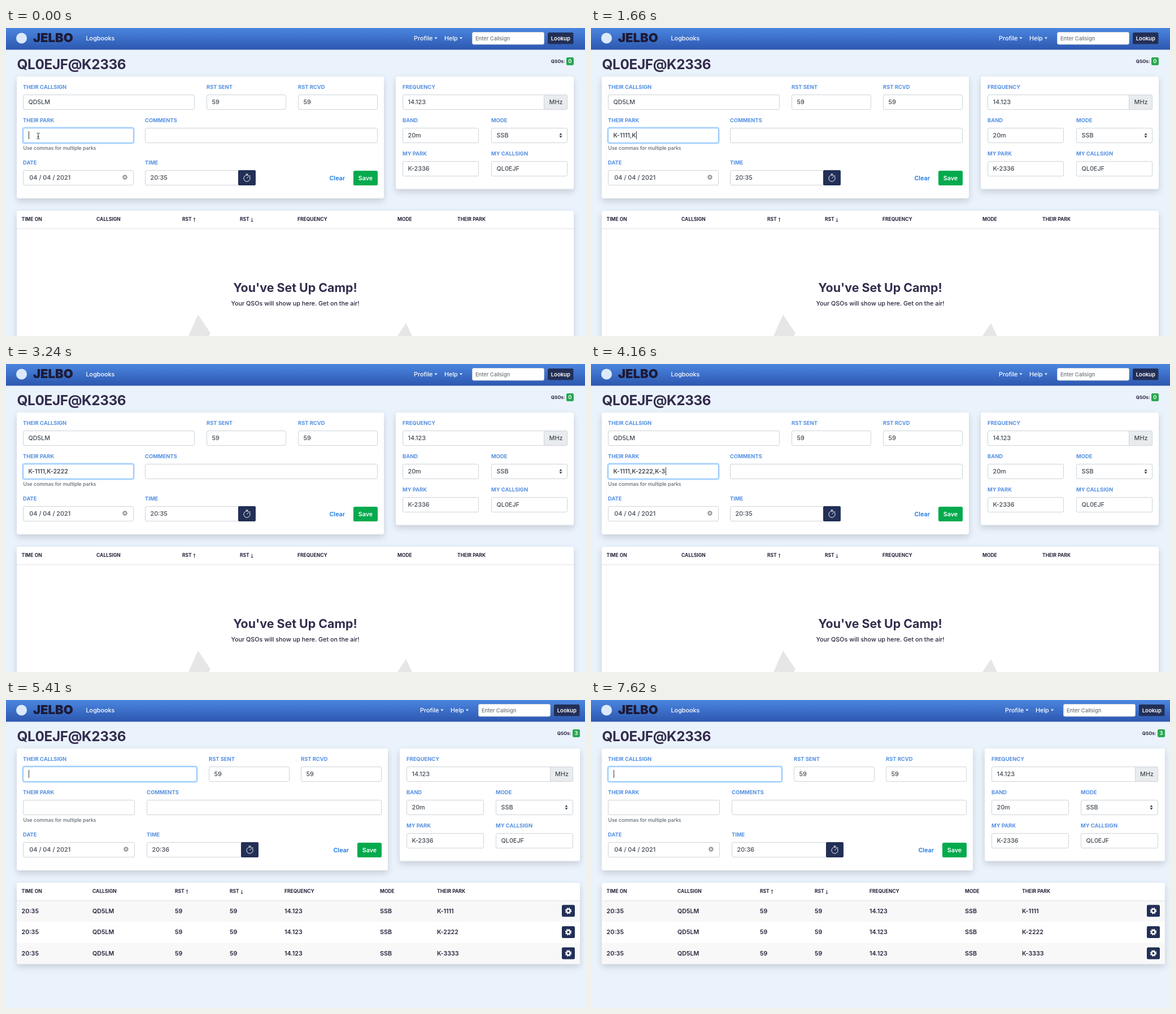
Animation, 1025 px wide and 546 px high, one loop 7720 ms. Source, as an HTML page:

```html
<!DOCTYPE html>
<html lang="en">
<head>
<meta charset="utf-8">
<title>Radio log</title>
<style>
  html, body { margin: 0; width: 100%; height: 100%; overflow: hidden; background: #eaf2fc; }
  svg { display: block; width: 1025px; height: 546px; font-family: Inter, Roboto, sans-serif; }
  .brand { font-size: 22px; font-weight: 900; fill: #1d1a36; }
  .nav { font-size: 10.8px; font-weight: 500; fill: #fff; }
  .title { font-size: 24.4px; font-weight: 700; fill: #332c4c; letter-spacing: -.4px; }
  .label { font-size: 9.4px; font-weight: 700; fill: #5590e2; }
  .value { font-size: 10.8px; font-weight: 500; fill: #434a52; }
  .typed { font-size: 10.6px; font-weight: 600; fill: #434a52; }
  .date { font-size: 10.9px; font-weight: 500; fill: #434a52; }
  .hint { font-size: 8.7px; font-weight: 500; fill: #5f6870; }
  .search { font-size: 9.3px; font-weight: 500; fill: #6c757d; }
  .small { font-size: 9.5px; font-weight: 600; fill: #fff; }
  .count { font-size: 8px; font-weight: 700; fill: #2b2740; }
  .link { font-size: 10.7px; font-weight: 600; fill: #1877e8; }
  .save { font-size: 10.7px; font-weight: 600; fill: #fff; }
  .head { font-size: 8.5px; font-weight: 700; fill: #25233a; }
  .row { font-size: 10.7px; font-weight: 600; fill: #25233a; }
  .camp { font-size: 21.4px; font-weight: 700; fill: #332c4c; }
  .sub { font-size: 10.8px; font-weight: 500; fill: #25233a; }
  .mid { text-anchor: middle; }
  .card { fill: #fff; filter: drop-shadow(0 5px 6px rgba(0, 0, 0, .15)); }
</style>
</head>
<body>
<svg id="stage" viewBox="0 0 1025 546"></svg>
<script>
const LOOP = 7720;
const CLEARED = 5370, SAVED = 5410, POINTER_GONE = 290;
const NAVY = '#222f56', GREEN = '#04aa4d';
const CALL = 'QD5LM', OWN = 'QL0EJF';

// time, text in the park field, caret shown
const TYPING = [
  [0, '', 1], [80, '', 0], [290, 'K', 0], [370, 'K', 1], [660, 'K', 0],
  [790, 'K-', 1], [870, 'K-1', 1], [950, 'K-11', 1], [1000, 'K-111', 1],
  [1080, 'K-1111', 1], [1250, 'K-1111', 0], [1450, 'K-1111,', 0],
  [1540, 'K-1111,', 1], [1660, 'K-1111,K', 1], [1790, 'K-1111,K', 0],
  [2080, 'K-1111,K-', 0], [2370, 'K-1111,K-', 1], [2450, 'K-1111,K-2', 1],
  [2540, 'K-1111,K-22', 1], [2620, 'K-1111,K-222', 1],
  [2700, 'K-1111,K-2222', 1], [2870, 'K-1111,K-2222K', 1],
  [3000, 'K-1111,K-2222K', 0], [3080, 'K-1111,K-2222', 1],
  [3240, 'K-1111,K-2222', 0], [3490, 'K-1111,K-2222,', 0],
  [3540, 'K-1111,K-2222,', 1], [3790, 'K-1111,K-2222,K', 0],
  [3830, 'K-1111,K-2222,K', 1], [3990, 'K-1111,K-2222,K-', 0],
  [4080, 'K-1111,K-2222,K-', 1], [4160, 'K-1111,K-2222,K-3', 1],
  [4240, 'K-1111,K-2222,K-33', 1], [4330, 'K-1111,K-2222,K-333', 1],
  [4410, 'K-1111,K-2222,K-3333', 1], [4660, 'K-1111,K-2222,K-3333', 0],
  [4950, 'K-1111,K-2222,K-3333', 1], [5250, 'K-1111,K-2222,K-3333', 0],
  [CLEARED, '', 0]
];
const BLINKS = [CLEARED, 5620, 5910, 6200, 6500, 6790, 7080, 7330, 7620];

// the page with and without the space taken by a scrollbar
const NARROW = {
  edge: 1005, form: 669, side: 690, call: 334, sent: 355, sentEnd: 496, rcvd: 517,
  park: 226, mid: 246, inner: 658, clock: 411, radio: 702, unit: 953, radioEnd: 994,
  band: 837, mode: 859, cols: [27.5, 160, 312, 414, 516, 693, 799], count: 0
};
const WIDE = {
  edge: 1016, form: 676, side: 697, call: 338, sent: 359, sentEnd: 502, rcvd: 522,
  park: 228, mid: 249, inner: 665, clock: 416, radio: 709, unit: 964, radioEnd: 1004,
  band: 846, mode: 867, cols: [27.5, 153, 299, 396, 493, 662, 763], count: 3
};

const text = (x, y, cls, str, id = '') =>
  `<text x="${x}" y="${y}" class="${cls}" ${id && `id="${id}"`}>${str}</text>`;
const box = (x1, y1, x2, y2, fill, r = 2.5) =>
  `<rect x="${x1}" y="${y1}" width="${x2 - x1}" height="${y2 - y1}" rx="${r}" fill="${fill}"/>`;
const card = (x1, y1, x2, y2) =>
  `<rect class="card" x="${x1}" y="${y1}" width="${x2 - x1}" height="${y2 - y1}" rx="3.5"/>`;
const line = (d, color, width = 1) =>
  `<path d="${d}" fill="none" stroke="${color}" stroke-width="${width}"/>`;
const shape = (d, color) => `<path d="${d}" fill="${color}"/>`;
const outline = (x1, y, x2, color = '#ced4da', height = 26) =>
  `<rect x="${x1 + .5}" y="${y + .5}" width="${x2 - x1 - 1}" height="${height}" rx="2.5" fill="#fff" stroke="${color}"/>`;

function field(x1, y, x2, label, value = '', cls = 'value') {
  return text(x1, y - 10, 'label', label) + outline(x1, y, x2) +
    text(x1 + 9.5, y + 17, cls, value);
}

function ring(x1, y, x2, id) {
  return `<g id="${id}">` +
    `<rect x="${x1 - .5}" y="${y - .5}" width="${x2 - x1 + 1}" height="28" rx="3.5" fill="none" stroke="#bfdeff" stroke-width="2.6"/>` +
    outline(x1, y, x2, '#80bdff') + '</g>';
}

function gear(x, y) {
  return box(x - 11.5, y - 10.5, x + 11.5, y + 10.5, NAVY) +
    `<g fill="none" stroke="#fff"><circle cx="${x}" cy="${y}" r="3.2" stroke-width="2.4"/>` +
    `<circle cx="${x}" cy="${y}" r="4.9" stroke-width="1.8" stroke-dasharray="2.1 1.75"/></g>`;
}

function stopwatch(x, y) {
  return box(x, y, x + 31, y + 27, NAVY, 2) +
    `<circle cx="${x + 15.5}" cy="${y + 14.5}" r="5.6" fill="none" stroke="#fff"/>` +
    line(`M${x + 13.5} ${y + 7}h4M${x + 15.5} ${y + 7}v2M${x + 20} ${y + 9}l1.5 1.5M${x + 15.5} ${y + 14.5}l2.5 -3`, '#fff');
}

function navBar(L) {
  const e = L.edge;
  const drop = x => shape(`M${x} 16.5h5l-2.5 3z`, '#fff');
  return text(e - 283, 21.5, 'nav', 'Profile') + drop(e - 246.5) +
    text(e - 229, 21.5, 'nav', 'Help') + drop(e - 202) +
    outline(e - 180, 7, e - 52, '#ced4da', 21.5) + text(e - 174, 21.5, 'search', 'Enter Callsign') +
    box(e - 46, 8, e - .5, 28.5, NAVY) + text(e - 23.2, 21.7, 'small mid', 'Lookup') +
    text(e - 40.3, 62, 'count', 'QSOs:') + box(e - 13, 52, e, 66, '#28a750') +
    text(e - 6.5, 62.2, 'small mid', L.count);
}

function logForm(L, time) {
  const x = L.park - 15.5;
  return card(19, 86, L.form, 302) +
    field(30, 118, L.call, 'THEIR CALLSIGN') +
    field(L.sent, 118, L.sentEnd, 'RST SENT', '59') +
    field(L.rcvd, 118, L.inner, 'RST RCVD', '59') +
    field(30, 177, L.park, 'THEIR PARK') +
    text(30.5, 215.5, 'hint', 'Use commas for multiple parks') +
    field(L.mid, 177, L.inner, 'COMMENTS') +
    field(30, 252, L.park, 'DATE') + text(41.3, 269, 'date', '04 / 04 / 2021') +
    `<circle cx="${x}" cy="264.5" r="4.2" fill="#98989b"/>` +
    line(`M${x - 1.7} 262.8l3.4 3.4m0 -3.4l-3.4 3.4`, '#fff', 1.1) +
    field(L.mid, 252, L.clock + 2, 'TIME', time) + stopwatch(L.clock, 252) +
    text(L.inner - 85.5, 270, 'link', 'Clear') +
    box(L.inner - 43, 253, L.inner, 279, GREEN) +
    text(L.inner - 21.5, 270, 'save mid', 'Save');
}

function radioForm(L) {
  const x = L.radioEnd - 12;
  return card(L.side, 86, L.edge, 285.5) +
    field(L.radio, 118, L.radioEnd, 'FREQUENCY', '14.123') +
    `<rect x="${L.unit - .5}" y="118.5" width="${L.radioEnd - L.unit}" height="26" rx="2" fill="#e9ecef" stroke="#ced4da"/>` +
    text((L.unit + L.radioEnd) / 2, 135, 'value mid', 'MHz') +
    field(L.radio, 177, L.band, 'BAND', '20m') +
    field(L.mode, 177, L.radioEnd, 'MODE', 'SSB') +
    shape(`M${x - 2.5} 189.5h5l-2.5 -3.2zM${x - 2.5} 191.2h5l-2.5 3.2z`, '#343a40') +
    field(L.radio, 236, L.band, 'MY PARK', 'K-2336') +
    field(L.mode, 236, L.radioEnd, 'MY CALLSIGN', OWN);
}

function tableHead(L) {
  const names = ['TIME ON', 'CALLSIGN', 'RST', 'RST', 'FREQUENCY', 'MODE', 'THEIR PARK'];
  const up = L.cols[2] + 21.5, down = L.cols[3] + 21.5;
  return names.map((name, i) => text(L.cols[i], 342.3, 'head', name)).join('') +
    line(`M${up} 343.5v-7m-1.6 1.8l1.6 -1.8l1.6 1.8M${down} 336.8v7m-1.6 -1.8l1.6 1.8l1.6 -1.8`, '#25233a', .9) +
    box(19, 355, L.edge, 356.5, '#e9eaec', 0);
}

function emptyTable(L) {
  return card(19, 324, L.edge, 600) + tableHead(L) +
    text(512, 468, 'camp mid', "You've Set Up Camp!") +
    text(512, 492, 'sub mid', 'Your QSOs will show up here. Get on the air!') +
    shape('M340 508L362 541L359 546H323zM708 523L719 546H693z', '#e6e6e7');
}

function filledTable(L) {
  const rows = ['K-1111', 'K-2222', 'K-3333'].map((park, i) => {
    const y = 355.5 + i * 37.6;
    const cells = ['20:35', CALL, '59', '59', '14.123', 'SSB', park];
    return box(19, y, L.edge, y + 37.5, i % 2 ? '#fff' : '#f8f8f9', i === 2 ? 3 : 0) +
      cells.map((cell, c) => text(L.cols[c], y + 22.2, 'row', cell)).join('') +
      gear(L.edge - 20.5, y + 18.3);
  });
  return card(19, 324, L.edge, 468) + rows.join('') + tableHead(L);
}

const stage = document.getElementById('stage');
stage.innerHTML =
  '<defs><linearGradient id="sky" x2="0" y2="1"><stop stop-color="#4b86df"/>' +
  '<stop offset="1" stop-color="#2c57b0"/></linearGradient></defs>' +
  box(0, 0, 1025, 546, '#eaf2fc', 0) + box(0, 0, 1025, 38.5, 'url(#sky)', 0) +
  '<circle cx="27.5" cy="18" r="9.5" fill="#dce9fa"/>' +
  text(48, 25.2, 'brand', 'JELBO') + text(141.5, 21.5, 'nav', 'Logbooks') +
  text(19.5, 73, 'title', OWN + '@K2336') +
  '<g id="before">' + navBar(NARROW) + logForm(NARROW, '<tspan id="clock">20:35</tspan>') +
  text(39.5, 135, 'value', CALL, 'call') + ring(30, 177, NARROW.park, 'parkRing') +
  text(39.5, 194, 'typed', '', 'typed') +
  `<g id="pointer">${line('M54.5 186.2q2 0 2.5 1.3q.5 -1.3 2.5 -1.3M57 187.5v8M54.5 196.8q2 0 2.5 -1.3q.5 1.3 2.5 1.3M55.5 192.8h3', '#222')}</g>` +
  radioForm(NARROW) + emptyTable(NARROW) + '</g>' +
  '<g id="after">' + navBar(WIDE) + logForm(WIDE, '20:36') + ring(30, 118, WIDE.call, 'callRing') +
  radioForm(WIDE) + filledTable(WIDE) + '</g>' +
  '<rect id="caret" width="1" height="14" fill="#333"/>';

const part = id => document.getElementById(id);
const show = (id, on) => { part(id).style.display = on ? '' : 'none'; };
const typed = part('typed'), caret = part('caret');

function draw(t) {
  const cleared = t >= CLEARED;
  const [, str, typing] = TYPING.findLast(step => step[0] <= t);
  const blink = BLINKS.filter(time => time <= t).length % 2;
  show('before', t < SAVED);
  show('after', t >= SAVED);
  show('pointer', t < POINTER_GONE);
  show('call', !cleared);
  show('caret', cleared ? blink : typing);
  part('clock').textContent = cleared ? '20:36' : '20:35';
  typed.textContent = str;
  const end = str ? typed.getComputedTextLength() : 0;
  caret.setAttribute('x', 40 + Math.round(end));
  caret.setAttribute('y', cleared ? 124 : 183);
}

const start = performance.now();
function tick() {
  draw((performance.now() - start) % LOOP);
  requestAnimationFrame(tick);
}
tick();
</script>
</body>
</html>
```
